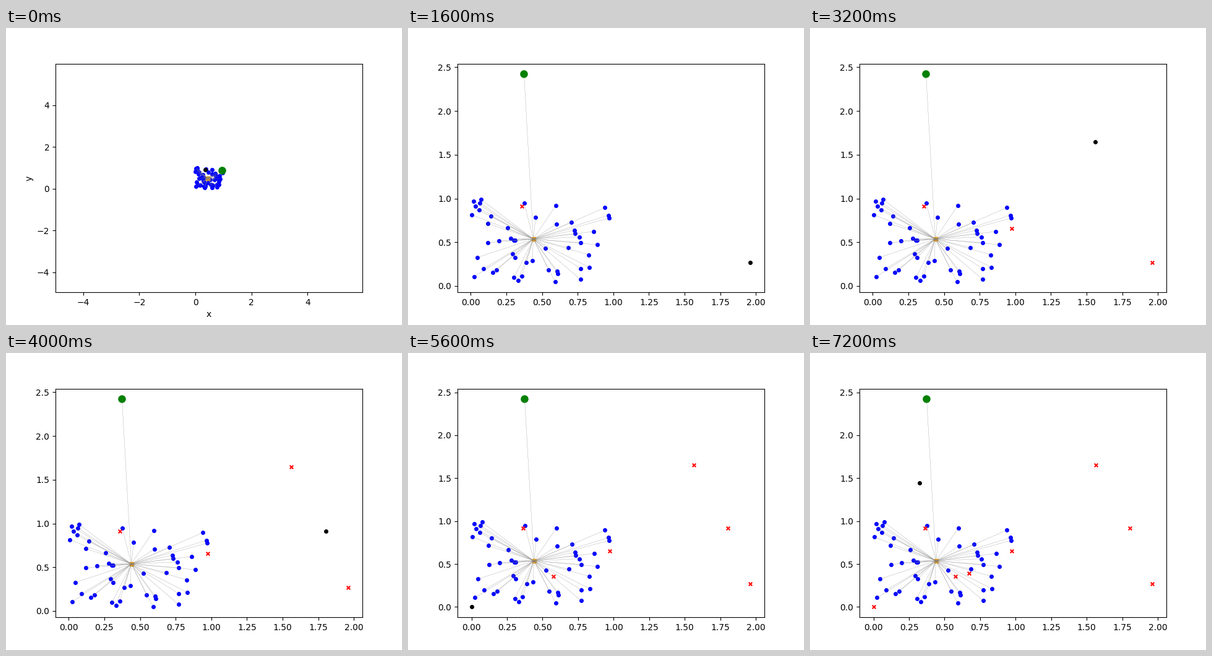
Write a matplotlib script that moves like this. It is 640 by 480 pixels and loops after 8 s.

```python
import numpy as np
import matplotlib.pyplot as plt
from matplotlib.animation import FuncAnimation

np.random.seed(42)
swarm = np.random.rand(50, 2)

# One candidate is tried per step; it joins only if it lies farther out
# than every point so far.
trials = np.array([
    (0.361, 0.915), (0.374, 2.422), (1.962, 0.267), (0.973, 0.654),
    (1.562, 1.65), (1.802, 0.915), (0.577, 0.353), (0, 0),
    (0.67, 0.39), (0.323, 1.441),
])

fig, ax = plt.subplots(figsize=(6.4, 4.8), dpi=100)


def farthest(points):
    return points[np.hypot(*points.T).argmax()]


def state_at(step):
    """Points and rejected candidates before the given step's trial."""
    points, rejected = swarm, []
    for trial in trials[:step]:
        if np.hypot(*trial) > np.hypot(*farthest(points)):
            points = np.vstack([points, trial])
        else:
            rejected.append(trial)
    return points, np.array(rejected).reshape(-1, 2)


def dots(points, color, marker="o", size=4):
    ax.scatter(*np.transpose(points), s=size ** 2, color=color, marker=marker)


def draw(step):
    ax.clear()
    points, rejected = state_at(step)
    center = points.mean(axis=0)

    dots(points, "blue")
    dots(center, "orange", "s")
    dots(farthest(points), "green", size=8)
    if len(rejected):
        dots(rejected, "red", "x")
    dots(trials[step], "black")
    for p in points:
        ax.plot(*zip(p, center), color="gray", lw=0.2)

    if step == 0:
        ax.set(xlim=(-4.99, 5.96), ylim=(-4.965, 5.99),
               xlabel="x", ylabel="y")


anim = FuncAnimation(fig, draw, frames=len(trials), interval=800,
                     init_func=lambda: None, repeat=True, repeat_delay=0)
plt.show()
```
